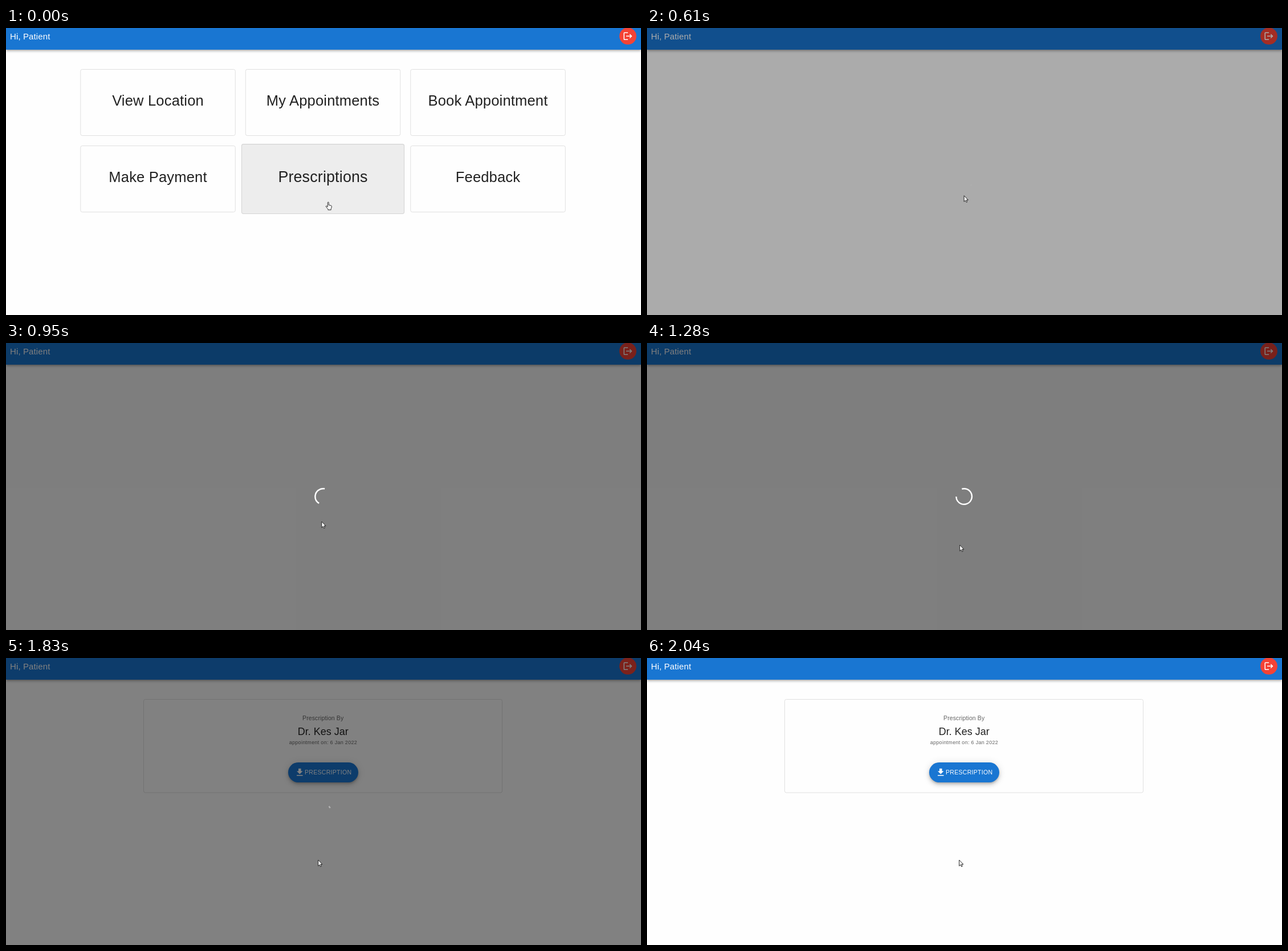
These frames come from a looping animation (1114 by 503 pixels, 3.08 s). An HTML page:

```html
<!DOCTYPE html>
<html lang="en">
<head>
<meta charset="utf-8">
<title>Prescriptions</title>
<style>
  html, body { margin: 0; width: 1114px; height: 503px; overflow: hidden; background: #fefefe; }
  body { position: relative; font-family: "Liberation Sans", Arial, sans-serif; }
  svg, #bar, #fab, #backdrop { position: absolute; left: 0; top: 0; }
  #bar { width: 1114px; height: 38px; background: #1976d2;
    box-shadow: 0 1.5px 3px -.75px #0003, 0 3px 3.75px #00000024, 0 .75px 7.5px #0000001f; }
  #fab { left: 494.5px; top: 182.5px; width: 123px; height: 35.5px; border-radius: 18px; background: #1976d2;
    box-shadow: 0 2.25px 3.75px -.75px #0003, 0 4.5px 7.5px #00000024, 0 .75px 13.5px #0000001f; }
  #backdrop { width: 1114px; height: 503px; background: #00000080; }
  rect { fill: #fefefe; stroke: #e0e0e0; }
  text { fill: #212121; text-anchor: middle; }
  .tile { font-size: 25.5px; letter-spacing: .00735em; }
  .light { fill: #fff; }
  .muted { fill: #666; }
</style>
</head>
<body>
<div id="bar"></div>
<svg width="1114" height="503">
  <text class="light" x="7" y="19.7" font-size="15" letter-spacing=".11" style="text-anchor:start">Hi, Patient</text>
  <circle cx="1091" cy="14.2" r="14.9" fill="#f44336"/>
  <path class="light" transform="translate(1082 5.2) scale(.75)" d="m17 7-1.41 1.41L18.17 11H8v2h10.17l-2.58 2.58L17 17l5-5zM4 5h8V3H4c-1.1 0-2 .9-2 2v14c0 1.1.9 2 2 2h8v-2H4z"/>
  <g id="menu"></g>
</svg>
<div id="result">
  <svg width="1114" height="503">
    <rect x="241.5" y="72.5" width="629" height="163.5" rx="3"/>
    <text class="muted" x="556.2" y="109.3" font-size="10.5" letter-spacing=".11">Prescription By</text>
    <text x="556.2" y="135" font-size="18">Dr. Kes Jar</text>
    <text class="muted" x="556.4" y="150.8" font-size="9" letter-spacing=".3">appointment on: 6 Jan 2022</text>
  </svg>
  <div id="fab"></div>
  <svg width="1114" height="503">
    <path class="light" transform="translate(506.3 191.6) scale(.75)" d="M19 9h-4V3H9v6H5l7 7 7-7zM5 18v2h14v-2z"/>
    <text class="light" x="565.2" y="204" font-size="10.5" letter-spacing=".3">PRESCRIPTION</text>
  </svg>
</div>
<div id="backdrop"></div>
<svg width="1114" height="503">
  <circle id="spinner" r="20.2" fill="none" stroke="#fff" stroke-width="3.6"/>
  <g id="cursor" fill="#fff" stroke="#111" stroke-width=".9" stroke-linejoin="round">
    <path id="arrow" d="M0 0V10.5L2.4 8.3 4 11.7 5.6 11 4.1 7.6H7.2Z"/>
    <path id="hand" d="M-1 1.4C-1 0 1 0 1 1.4V5.6L5 6.4C5.8 6.6 6 7.2 6 7.9C6 9.9 5.1 11.2 4.8 12.3V14H-.4V12.6C-1.2 11.6-2.8 10-3.9 8.3C-4.4 7.2-3.2 6.6-2.4 7.4L-1 8.8Z"/>
  </g>
</svg>
<script>
const $ = id => document.getElementById(id);
const clamp = v => Math.min(1, Math.max(0, v));
const show = (id, on) => $(id).style.display = on ? "" : "none";

// cubic-bezier timing function, solved by bisection
function bezier(x1, y1, x2, y2) {
  const at = (a, b, s) => 3 * a * s * (1 - s) ** 2 + 3 * b * s * s * (1 - s) + s ** 3;
  return x => {
    let lo = 0, hi = 1;
    for (let i = 0; i < 24; i++) {
      const mid = (lo + hi) / 2;
      if (at(x1, x2, mid) < x) lo = mid; else hi = mid;
    }
    return at(y1, y2, lo);
  };
}
const easeInOut = bezier(.42, 0, .58, 1);
const standard = bezier(.4, 0, .2, 1);
const linear = p => p;

// value at time t along points [time, value]
function track(t, points, ease = linear) {
  let [t0, v0] = points[0];
  for (const [t1, v1] of points) {
    if (t < t1) return t1 === t0 ? v0 : v0 + (v1 - v0) * ease(clamp((t - t0) / (t1 - t0)));
    [t0, v0] = [t1, v1];
  }
  return v0;
}

const tiles = ["View Location", "My Appointments", "Book Appointment", "Make Payment", "Prescriptions", "Feedback"];
$("menu").innerHTML = tiles.map((name, i) => {
  const x = 266.5 + i % 3 * 289.5, y = 130.5 + (i > 2) * 134;
  const hover = name === "Prescriptions";
  return `<g transform="translate(${x} ${y}) scale(${hover ? 1.05 : 1})">
    <rect x="-135.75" y="-58" width="271.5" height="116" rx="3" ${hover ? 'style="fill:#ededed;stroke:#d4d4d4"' : ""}/>
    <text class="tile" y="5">${name}</text></g>`;
}).join("");

// the screen refreshes in evenly spaced steps: [first, last, count]
const LOOP = 3080;
const ticks = [0];
for (const [a, b, n] of [[160, 520, 6], [610, 680, 2], [760, 1280, 9], [1350, 1830, 8], [1900, 2040, 3]])
  for (let i = 0; i < n; i++) ticks.push(a + (b - a) * i / (n - 1));

function drawSpinner(t) {
  const ms = track(t, [[532, 0], [680, 155], [1280, 785], [1830, 1300]]);
  const grow = easeInOut(clamp(ms / 700)), slide = easeInOut(clamp((ms - 700) / 700));
  const s = $("spinner");
  s.setAttribute("transform", `translate(556.2 269) rotate(${ms / 1400 * 360}) scale(.682)`);
  s.setAttribute("stroke-dasharray", `${1 + 99 * grow} 200`);
  s.setAttribute("stroke-dashoffset", -15 * grow - 110 * slide);
  s.style.opacity = track(t, [[600, 0], [680, .4], [760, 1], [1760, 1], [1830, .4], [1890, 0]]);
}

function draw(t) {
  const onMenu = t < 445;
  show("menu", onMenu);
  show("hand", onMenu);
  show("arrow", !onMenu);
  show("result", t > 1800);
  $("backdrop").style.opacity = standard(clamp((t - 515) / 225)) - standard(clamp((t - 1815) / 195));
  drawSpinner(t);
  const x = track(t, [[160, 565.3], [445, 556.2], [690, 556.2], [1200, 548.7], [1760, 548.7], [1830, 547.7]], easeInOut);
  const y = track(t, [[160, 304.8], [445, 293.8], [690, 293.8], [1200, 354]], easeInOut);
  $("cursor").setAttribute("transform", `translate(${x} ${y})`);
}

function frame() {
  const now = performance.now() % LOOP;
  draw(ticks.findLast(tick => tick <= now + .01));
  requestAnimationFrame(frame);
}
frame();
</script>
</body>
</html>
```
